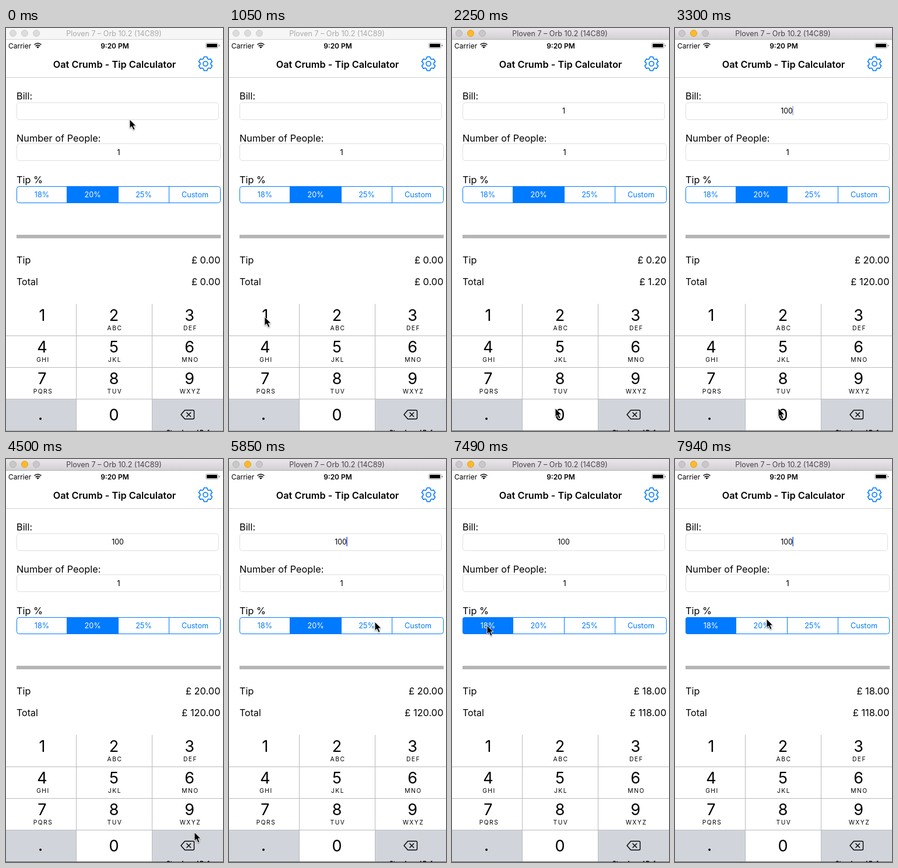
Animation, 372 px wide and 688 px high, one loop 8000 ms. Source, as an HTML page:

```html
<!DOCTYPE html>
<html lang="en">
<head>
<meta charset="utf-8">
<title>Tip calculator</title>
<style>
  html, body { margin: 0; width: 372px; height: 688px; overflow: hidden; background: #fff; }
  svg { display: block; font-family: Inter, "Liberation Sans", sans-serif; }
</style>
</head>
<body>
<svg id="stage" width="372" height="688" viewBox="0 0 372 688">
  <defs>
    <linearGradient id="bar" x2="0" y2="1">
      <stop stop-color="#e9e7e9"/><stop offset="1" stop-color="#d1cfd1"/>
    </linearGradient>
    <clipPath id="sliver"><path d="M0 686H372V688H0z"/></clipPath>
  </defs>
</svg>
<script>
const BLUE = '#007aff', GRAY = '#d1d5db', LOOP = 8000, STEP = 150;
const stage = document.getElementById('stage');

function add(tag, attrs, content = '') {
  const el = document.createElementNS('http://www.w3.org/2000/svg', tag);
  for (const k in attrs) el.setAttribute(k, attrs[k]);
  el.textContent = content;
  return stage.appendChild(el);
}
const rect = (x, y, width, height, fill, more) => add('rect', { x, y, width, height, fill, ...more });
const line = (d, stroke, width = 1, more) => add('path', { d, stroke, 'stroke-width': width, fill: 'none', ...more });
const text = (s, x, y, size, more) => add('text', { x, y, 'font-size': size, ...more }, s);
const mid = { 'text-anchor': 'middle' }, end = { 'text-anchor': 'end' };
const set = (el, name, value) => el.setAttribute(name, value);

// Window title bar
const titleBar = rect(0, 0, 372, 20, '#f6f6f6');
const titleEdge = line('M0 19.5H372', '#d4d4d4');
const lights = [12, 32, 52].map(cx => add('circle', { cx, cy: 9, r: 5.5 }));
const title = text('Ploven 7 – Orb 10.2 (14C89)', 185, 13.5, 12.5, mid);

// Status bar
text('Carrier', 4, 34.5, 12);
line('M48.5 28.5Q54.5 23.5 60.5 28.5M50.6 31Q54.5 27.8 58.4 31', '#000', 1.6);
add('path', { d: 'M52.2 32.2Q54.5 30.6 56.8 32.2L54.5 34.8z' });
text('9:20 PM', 186.5, 34.5, 12, { ...mid, 'font-weight': 600 });
rect(342.5, 25.5, 21, 9, '#fff', { rx: 2, stroke: '#999', 'stroke-width': .8 });
rect(344, 27, 18, 6, '#000', { rx: .8 });
rect(364.8, 28.5, 1.5, 3, '#777', { rx: .7 });

// Navigation bar
text('Oat Crumb - Tip Calculator', 186, 68, 16.3, { ...mid, 'font-weight': 600 });
line('M0 84.5H372', '#cfcfcf');
const teeth = [];
for (let i = 0; i < 6; i++)
  for (const [turn, r] of [[-.38, 9.3], [-.22, 12], [.22, 12], [.38, 9.3]]) {
    const a = i * Math.PI / 3 + turn;
    teeth.push((342 + r * Math.sin(a)).toFixed(2) + ' ' + (61 - r * Math.cos(a)).toFixed(2));
  }
line(`M${teeth.join('L')}z`, BLUE, 1.6, { 'stroke-linejoin': 'round' });
add('circle', { cx: 342, cy: 61, r: 4, fill: 'none', stroke: BLUE, 'stroke-width': 1.6 });

// Form
const field = { rx: 4.5, stroke: '#dedede' };
text('Bill:', 18, 122, 16.3);
rect(18.5, 127.5, 346, 29, '#fff', field);
const bill = text('', 191.5, 146, 12.4, mid);
const caret = rect(0, 133, 1.7, 16, '#426bf2');
text('Number of People:', 18, 194, 16.3);
rect(18.5, 197.5, 349, 29, '#fff', field);
text('1', 193, 217, 13.5, mid);
text('Tip %', 18, 265, 16.3);

const edges = [18, 104, 192, 279, 368];
const fills = edges.slice(0, 4).map((x, i) =>
  rect(x, 270, edges[i + 1] - x + .5, 29, BLUE, i % 3 ? {} : { rx: 4 }));
rect(18.5, 270.5, 349, 28, 'none', { rx: 4, stroke: BLUE });
line('M104.5 270V299M192.5 270V299M279.5 270V299', BLUE);
const options = ['18%', '20%', '25%', 'Custom'].map((s, i) =>
  text(s, [61.5, 148.5, 236, 324][i], 289, 12.7, mid));

rect(18, 353, 350, 6, '#b5b5b5');
text('Tip', 18, 402, 16.3);
text('Total', 18, 439, 16);
const tip = text('', 367.5, 402, 16.4, end);
const total = text('', 367.5, 439, 16.4, end);

// Keypad
const cols = [0, 121, 251, 372], centers = [62, 185, 314.5];
const letters = ['', 'ABC', 'DEF', 'GHI', 'JKL', 'MNO', 'PQRS', 'TUV', 'WXYZ'];
const keys = {};
[...'123456789.0<'].forEach((c, i) => {
  const col = i % 3, row = Math.floor(i / 3), y = 471 + row * 54;
  keys[c] = rect(cols[col], y, cols[col + 1] - cols[col], 54, '.<'.includes(c) ? GRAY : '#fff');
  if (c === '.') text(c, 59, 669, 27, { ...mid, 'font-weight': 500 });
  else if (c !== '<') text(c, centers[col], row < 3 ? y + 29 : 670, 27, mid);
  if (letters[i]) text(letters[i], centers[col] + 1.5, y + 45, 10.3, { ...mid, 'letter-spacing': 1.5 });
});
line('M0 525.5H372M0 579.5H372M0 633.5H372M120.5 471V687M250.5 471V687', '#b9babd');
line('M306.5 652.5H320.5Q322.5 652.5 322.5 654.5V665.5Q322.5 667.5 320.5 667.5H306.5L300 660z' +
  'M309.5 656.2L317 663.8M317 656.2L309.5 663.8', '#000', 1.4, { 'stroke-linejoin': 'round' });
const bottomEdge = line('M0 687.5H372', '#a9a9ac');
text('Storyboard Refere', 275, 693.5, 10, { 'font-weight': 700, 'clip-path': 'url(#sliver)' });

const pointer = add('path', {
  d: 'M0 0V15.2L3.5 12L6.2 18L9 16.8L6.4 11H11z', stroke: '#fff', 'stroke-width': 1,
  style: 'filter: drop-shadow(0 1px 1px #0006)'
});

// Pointer stops: time, x, y
const path = [
  [0, 212, 156], [300, 195, 300], [600, 150, 612], [900, 75, 530], [1050, 61, 493],
  [1500, 61, 493], [1800, 120, 590], [2100, 177, 649], [3600, 177, 649], [4200, 338, 600],
  [4650, 315, 656], [5250, 315, 656], [5400, 268, 310], [5550, 268, 310], [5700, 250, 278],
  [6300, 250, 278], [6600, 130, 298], [6750, 76, 310], [6900, 64, 292], [7050, 60, 284],
  [7490, 60, 284], [7940, 157, 273]
];
function pointerAt(t) {
  const i = path.findIndex(p => p[0] > t);
  if (i < 0) return path[path.length - 1].slice(1);
  const [a, b] = [path[i - 1], path[i]], k = (t - a[0]) / (b[0] - a[0]);
  return [1, 2].map(n => a[n] + (b[n] - a[n]) * k);
}

// The caret blinks once a second and stays lit for a while after typing.
function caretAt(t) {
  if (t >= 1500 && t < 2100 || t >= 2400 && t < 3300) return 1;
  const start = t < 1500 ? -200 : t < 2400 ? 2100 : 3300;
  const p = (t - start) % 1000;
  return p >= 100 && p < 340 ? 0 : p >= 500 && p < 940 ? 1 : .5;
}

const money = n => '£ ' + n.toFixed(2);

function draw(t) {
  const active = t >= 1200;
  const amount = t < 1500 ? '' : t < 2550 ? '1' : t < 2700 ? '10' : '100';
  const choice = t < 6150 ? 1 : t < 7490 ? 2 : 0;
  const tipValue = amount * [.18, .2, .25][choice];

  set(titleBar, 'fill', active ? 'url(#bar)' : '#f6f6f6');
  set(titleEdge, 'stroke', active ? '#b4b2b4' : '#d4d4d4');
  set(bottomEdge, 'stroke', active ? '#6a6a6e' : '#a9a9ac');
  set(title, 'fill', active ? '#444' : '#a9a9a9');
  lights.forEach((el, i) => {
    const lit = active && i === 1;
    set(el, 'fill', lit ? '#fdb92c' : active ? '#c9c8c9' : '#dcdcdc');
    set(el, 'stroke', lit ? '#dfa023' : active ? '#b5b4b5' : '#cecece');
  });

  bill.textContent = amount;
  tip.textContent = money(tipValue);
  total.textContent = money(+amount + tipValue);
  set(caret, 'x', 191 + [0, 3, 7, 10.3][amount.length]);
  set(caret, 'opacity', caretAt(t));
  options.forEach((el, i) => {
    set(fills[i], 'fill', i === choice ? BLUE : '#fff');
    set(el, 'fill', i === choice ? '#fff' : BLUE);
  });
  set(keys[1], 'fill', t >= 1350 && t < 1500 ? GRAY : '#fff');
  set(keys[0], 'fill', t >= 2400 && t < 2700 ? GRAY : '#fff');
  set(pointer, 'transform', `translate(${pointerAt(t).map(Math.round)})`);
}

function frame(now) {
  const t = now % LOOP, base = t < 7340 ? 0 : 7340;
  draw(base + Math.floor((t - base) / STEP) * STEP);
  requestAnimationFrame(frame);
}
draw(0);
requestAnimationFrame(frame);
</script>
</body>
</html>
```
